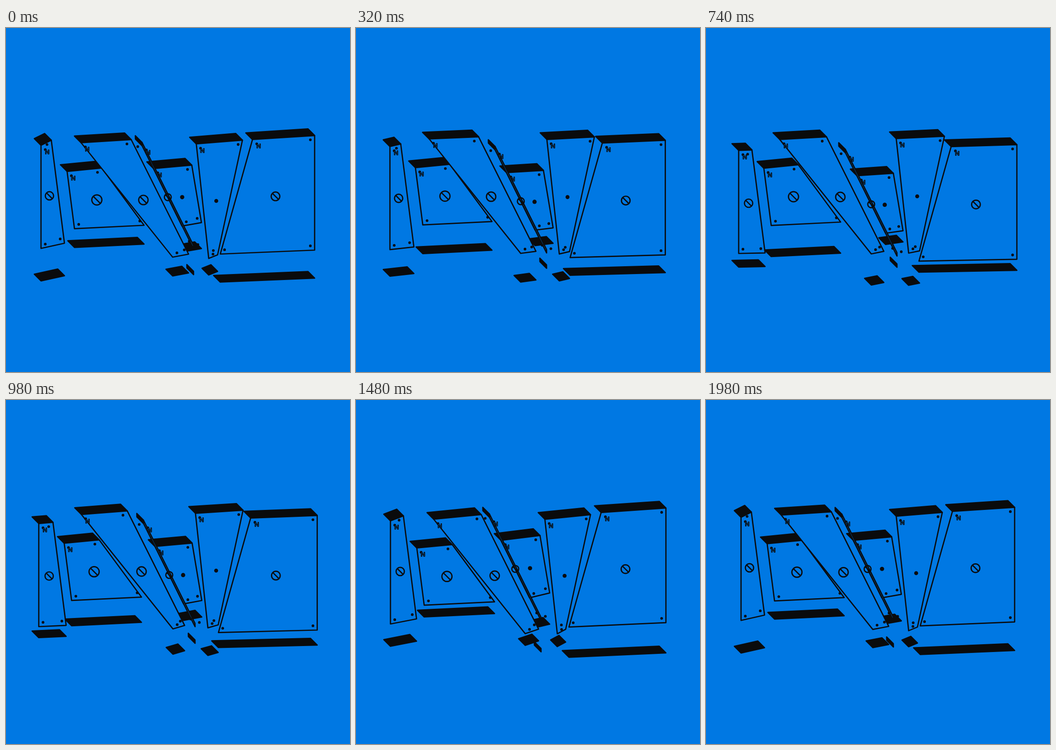
An HTML page with a canvas for the animation above (2000 ms loop, 748 px wide and 748 px high).

```html
<!DOCTYPE html>
<html lang="en">
<head>
<meta charset="utf-8">
<title>Swaying panels</title>
<style>
  html, body { margin: 0; width: 100%; height: 100%; overflow: hidden; background: #0078e3; }
  canvas { display: block; width: 748px; height: 748px; }
</style>
</head>
<body>
<canvas id="stage" width="748" height="748"></canvas>
<script>
const ctx = document.getElementById('stage').getContext('2d');
const BLUE = '#0078e3', INK = '#0a0b0c';
const LOOP = 2000, DEPTH = 14.5, INSET = 9.3, LINE = 2.7;

// Every moving value is [mean, cosine part, sine part] over one loop.
// l, r: top ends of the side edges (x, y); dl, dr: run of each edge down to its foot;
// gap: drop of the loose bottom lid below the face; ring or disc: radius of the middle mark.
const panels = [
  { l: [[322.2, -1.47, 7.07], [311.8, -6.2, 7.14]], dl: [62, 125],
    r: [[404.2, -0.22, 4.12], [304.3, -6.11, 10.08]], dr: [21, 125],
    gap: [46.8, 9.6, -21.7], disc: 4.6 },
  { l: [[129.8, 3.05, -2.65], [312, -0.1, -9.76]], dl: [16, 124.4],
    r: [[205.5, 2.71, -3.94], [304.6, -0.08, -9.78]], dr: [92, 124.5],
    gap: [47.2, -6.35, 22.1], ring: 11 },
  { l: [[73.7, 2.4, -1.4], [261.8, -6.79, -0.57]], dl: [0, 224.2],
    r: [[100.4, -1.9, -2.52], [254.9, -10.92, 3.64]], dr: [28.6, 224],
    gap: [47.4, 23.3, -2.56], ring: 9 },
  { l: [[163.8, -0.46, -5.18], [249.5, -0.03, -9.77]], dl: [199, 248.8],
    r: [[268.1, 4.17, -4.44], [242.2, 0.57, -7.03]], dr: [124.7, 249],
    gap: [47.2, -6.35, 22.1], ring: 10.2 },
  { l: [[297.3, -1.38, 6.97], [262.1, -6.15, 7.12]], dl: [112, 224.3],
    r: [[297.1, -1.38, 6.97], [254.7, -6.11, 7.09]], dr: [112, 224.3],
    gap: [46.7, 9.3, -21.75], ring: 7.5 },
  { l: [[412.8, 0.98, 2.03], [249.5, 2.5, -10]], dl: [27, 249],
    r: [[514.6, -0.5, 4.72], [242.1, 1.87, -7.32]], dr: [-54, 249.2],
    gap: [47.4, -11.3, 20.3], disc: 4.3 },
  { l: [[533.9, 2.02, 0.74], [249.4, -6.89, 5.2]], dl: [-70, 249],
    r: [[673.9, -2.82, 0.19], [242.2, -8.39, 7.77]], dr: [0, 249.2],
    gap: [47.4, 13.6, -19.2], ring: 9.4 }
];

const move = (p, dx, dy) => [p[0] + dx, p[1] + dy];

function poly(points, fill) {
  ctx.beginPath();
  points.forEach(p => ctx.lineTo(p[0], p[1]));
  ctx.closePath();
  ctx.fillStyle = fill;
  ctx.fill();
  ctx.stroke();
}

function dot(x, y, radius) {
  ctx.beginPath();
  ctx.arc(x, y, radius, 0, Math.PI * 2);
  ctx.fillStyle = INK;
  ctx.fill();
}

// Slanted lid running back from an edge
function lid(a, b) {
  poly([a, b, move(b, -DEPTH, -DEPTH), move(a, -DEPTH, -DEPTH)], INK);
}

function ring(x, y, radius) {
  const d = radius * Math.SQRT1_2;
  ctx.beginPath();
  ctx.arc(x, y, radius, 0, Math.PI * 2);
  ctx.moveTo(x - d, y - d);
  ctx.lineTo(x + d, y + d);
  ctx.stroke();
}

function letter(x, y) {
  ctx.lineWidth = 1.3;
  ctx.fillStyle = BLUE;
  ctx.fillText('N', x, y);
  ctx.strokeText('N', x, y);
  ctx.lineWidth = LINE;
}

function drawPanel(panel, c, s) {
  const at = w => w[0] + w[1] * c + w[2] * s;
  const l = panel.l.map(at), r = panel.r.map(at), gap = at(panel.gap);
  const lf = move(l, ...panel.dl), rf = move(r, ...panel.dr);

  lid(move(lf, 0, gap), move(rf, 0, gap));
  lid(l, r);
  poly([l, r, rf, lf], BLUE);

  dot(l[0] + INSET, l[1] + INSET, 2.9);
  dot(r[0] - INSET, r[1] + INSET, 2.9);
  dot(rf[0] - INSET, rf[1] - INSET, 2.9);
  dot(lf[0] + INSET, lf[1] - INSET, 2.9);
  letter(l[0] + 13.4, l[1] + 18.7);

  const x = (l[0] + r[0] + lf[0] + rf[0]) / 4;
  const y = (l[1] + r[1] + lf[1] + rf[1]) / 4 + 3.4;
  if (panel.ring) ring(x, y, panel.ring);
  else dot(x, y, panel.disc);
}

function draw(time) {
  const angle = (time % LOOP) / LOOP * Math.PI * 2;
  const c = Math.cos(angle), s = Math.sin(angle);
  ctx.fillStyle = BLUE;
  ctx.fillRect(0, 0, 748, 748);
  ctx.strokeStyle = INK;
  ctx.lineWidth = LINE;
  ctx.lineJoin = 'round';
  ctx.font = 'bold 13.5px "Liberation Sans", Arial, sans-serif';
  ctx.textAlign = 'center';
  panels.forEach(p => drawPanel(p, c, s));
}

let start;
function frame(now) {
  if (start === undefined) start = now;
  draw(now - start);
  requestAnimationFrame(frame);
}
draw(0);
requestAnimationFrame(frame);
</script>
</body>
</html>
```
